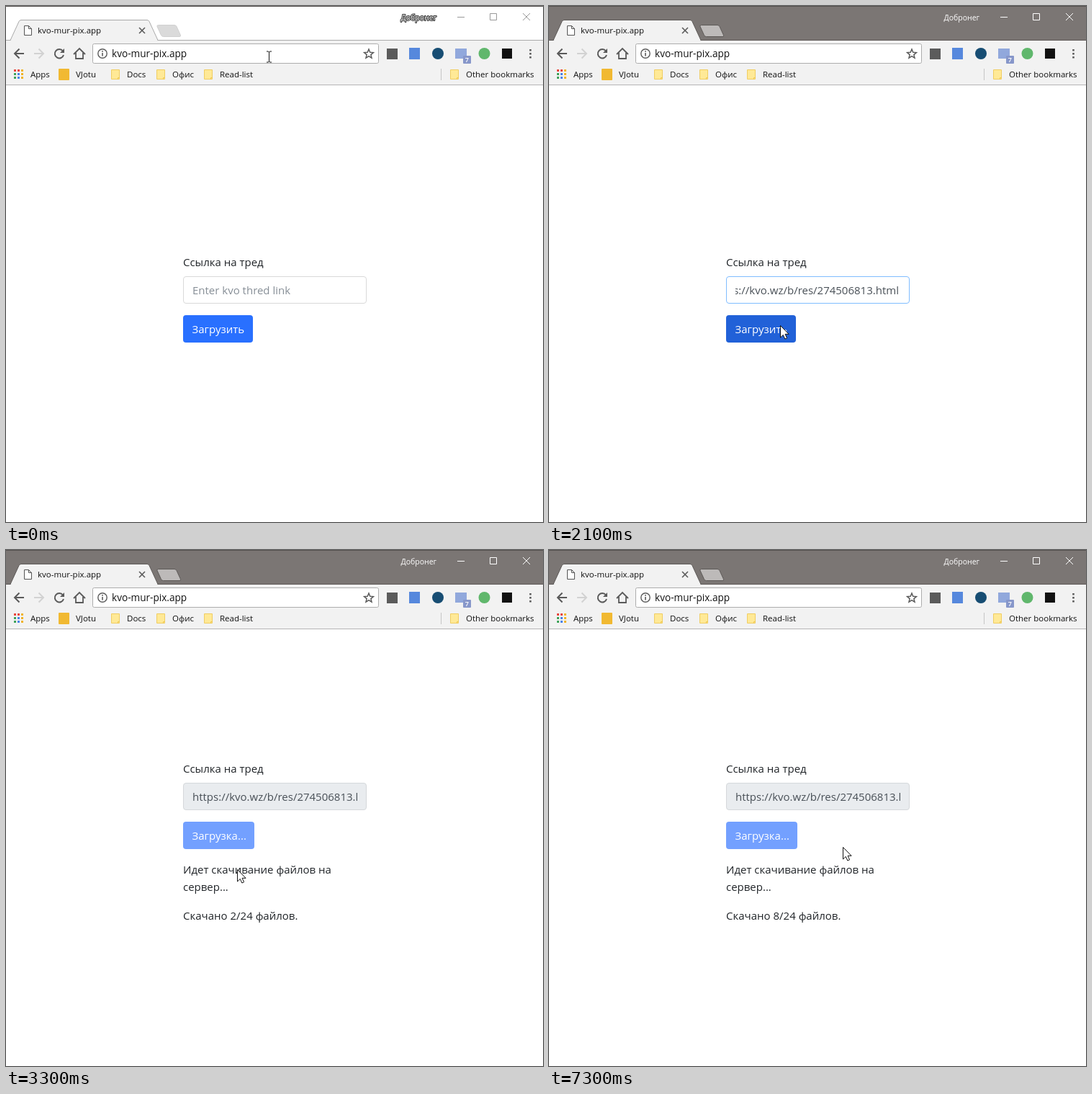
Recreate the animation shown at these times as an HTML page. Size 746 by 716 pixels, loop 8 s.

```html
<!DOCTYPE html>
<html lang="ru">
<head>
<meta charset="utf-8">
<title>Thread loader</title>
<style>
  html, body { margin: 0; width: 100%; height: 100%; overflow: hidden; background: #fff; }
  svg { display: block; }
  text { font-family: "Open Sans", "Noto Sans", sans-serif; white-space: pre; }
  .small { font-size: 11.5px; fill: #111; }
  .page { font-size: 15px; fill: #212529; }
  .icon { fill: none; stroke: #5a5a5a; stroke-width: 2; }
  #caption { fill: none; stroke: #999; }
  .active #caption { stroke: #fff; }
  #user { font-size: 10.5px; fill: #fff; stroke: #333; stroke-width: 2; paint-order: stroke; stroke-linejoin: round; }
  .active #user { stroke: none; }
  #titlebar { fill: #fff; }
  .active #titlebar { fill: #7b7674; }
  #tabs { stroke: #a9a9a9; }
  .active #tabs { stroke: #5d5957; }
  #newTab { fill: #dadada; stroke: #d0d0d0; }
  .active #newTab { fill: #bdbab9; stroke: #5d5957; }
</style>
</head>
<body>
<svg id="stage" width="746" height="716" viewBox="0 0 746 716">
  <defs>
    <clipPath id="inputClip"><rect x="259" y="376" width="229" height="36"/></clipPath>
    <g id="folder">
      <path d="M.5 1.5h11v13H.5z" fill="#ffe996" stroke="#f0cd62"/>
      <path d="M9.5 14.5v-2h2" fill="none" stroke="#efc64f"/>
    </g>
  </defs>

  <rect id="titlebar" width="746" height="48"/>
  <path d="M0 .5H746" stroke="#55514f"/>
  <text id="user" x="548.5" y="20">Добронег</text>
  <path id="caption" d="M627 15.5h10M672.5 10.5h9v9h-9zM718 10l10 10m0-10l-10 10"/>

  <rect y="48" width="746" height="61" fill="#f2f2f2"/>
  <path d="M0 109.5H746" stroke="#b6b4b6"/>
  <g id="tabs">
    <path d="M0 47.5H746"/>
    <path d="M6 47.5L18 21.5Q19 19.5 21 19.5H196Q198 19.5 199 21.5L211 47.5" fill="#f2f2f2"/>
    <path d="M7 48H210" stroke="#f2f2f2" stroke-width="2"/>
    <path id="newTab" d="M211.5 26.5H234Q236 26.5 237 28.5L242.5 40.5Q243 42.5 241 42.5H218.5Q216.5 42.5 215.5 40.5L210 28.5Q209.5 26.5 211.5 26.5z"/>
  </g>
  <path d="M25.500 27.500h6l4 4v9h-10zM31.500 27.500v4h4" fill="#fff" stroke="#555"/>
  <text class="small" x="44" y="38">kvo-mur-pix.app</text>
  <path class="icon" style="stroke-width:1.6" d="M185 30l8 8m0-8l-8 8"/>

  <path class="icon" d="M25 66H12.5M18.5 59.5L12 66l6.500 6.500"/>
  <path class="icon" style="stroke:#d2d2d2" d="M39 66h12.5M45.5 59.5L52 66l-6.500 6.500"/>
  <path class="icon" d="M79 62.5A6.200 6.200 0 1 0 80 68"/>
  <path d="M81 59v6h-6z" fill="#5a5a5a"/>
  <path class="icon" style="stroke-width:1.8" d="M94 67l8-8 8 8M97 65v8h10v-8"/>
  <rect x="120.5" y="52.5" width="397" height="27" rx="2" fill="#fff" stroke="#adadad"/>
  <circle class="icon" style="stroke-width:1.4" cx="134" cy="66" r="6.2"/>
  <path class="icon" style="stroke-width:1.6" d="M134 62v1.8M134 65v4.5"/>
  <text x="147" y="71" font-size="13.6" fill="#111">kvo-mur-pix.app</text>
  <path class="icon" style="stroke-width:1.5" d="M504 60l1.8 4.2 4.6.4-3.5 3 1.1 4.500-4-2.400-4 2.400 1.100-4.500-3.500-3 4.600-.4z"/>

  <rect x="529" y="59" width="15" height="15" fill="#5b5b5b"/>
  <rect x="560" y="58" width="15" height="16" fill="#5688dd"/>
  <circle cx="600" cy="66" r="8" fill="#174d73"/>
  <rect x="624" y="59" width="16" height="14" fill="#91a8dc"/>
  <rect x="635" y="69" width="11" height="11" rx="1" fill="#8797ca"/>
  <text x="637.7" y="78" font-size="9" font-weight="600" fill="#fff">7</text>
  <circle cx="664.5" cy="66" r="8" fill="#60b76c"/>
  <rect x="689" y="59" width="14" height="14" fill="#111"/>
  <path d="M728.5 60v2.6M728.5 65v2.6M728.5 70v2.6" stroke="#5a5a5a" stroke-width="2.6"/>

  <g id="apps"></g>
  <rect x="73" y="87" width="15" height="16" rx="1" fill="#f1b932"/>
  <g id="bookmarks"></g>
  <path d="M604.5 87v16" stroke="#c5c5c5"/>

  <g id="form">
    <text class="page" x="246" y="361">Ссылка на тред</text>
    <rect id="field" x="246.5" y="375.5" width="254" height="37" rx="3.5"/>
    <g clip-path="url(#inputClip)"><text id="value" class="page" y="400"></text></g>
    <path id="caret" stroke="#222"/>
    <rect id="ring" x="245" y="428" height="40" rx="5" fill="none" stroke="#2970ff" stroke-width="2"/>
    <rect id="button" x="246" y="429" height="38" rx="4"/>
    <text id="action" class="page" x="258.5" y="454" style="fill:#fff"></text>
    <text id="line1" class="page" x="246" y="501"></text>
    <text id="line2" class="page" x="246" y="525"></text>
    <text id="status" class="page" x="246" y="565"></text>
  </g>

  <g id="pointer">
    <path id="arrow" d="M-.5 .5v16.5l3.800-3.600 2.500 5.600 2.800-1.200-2.500-5.500h5z" fill="#fff" stroke="#111"/>
    <path id="beam" d="M-3.500-7.500h2.500l1 1 1-1h2.500M0-6.500V6.500M-3.500 7.500h2.500l1-1 1 1h2.500" transform="translate(.5 .5)" fill="none" stroke="#111"/>
  </g>
</svg>
<script>
const LOOP = 8000, STEP = 100;
const LINK = "https://kvo.wz/b/res/274506813.html";
const $ = id => document.getElementById(id);
const set = (id, attrs) => {
  for (const name in attrs) $(id).setAttribute(name, attrs[name]);
};
const show = (id, visible) => set(id, { visibility: visible ? "visible" : "hidden" });

// Value of the last [time, value] pair that has been reached.
const at = (t, pairs) => pairs.filter(([start]) => t >= start).pop()[1];

const POINTER = [
  [0, 365, 70], [600, 343, 384], [1600, 343, 384],
  [2000, 322, 443], [3600, 322, 443], [4200, 409, 412], [LOOP, 409, 412]
];
const FIELD_STROKE = [[0, "#d9d9d9"], [700, "#b2cbe3"], [800, "#80bdff"], [2500, "#d5d8db"]];
const BUTTON_FILL = [[0, "#2970ff"], [2500, "#3872e8"], [2600, "#73a0ff"]];
const RING_OPACITY = [[0, 0], [2400, .4], [2500, .12], [2600, 0]];
const SHIFT = [[0, 0], [2600, -20], [2900, -32], [3000, -52]];
const MESSAGE = [[0, ""], [2600, "Идет обработка треда..."], [2900, "Идет скачивание файлов на"]];
const COUNT = [[0, 0], [3000, 1], [3300, 2], [3500, 3], [3700, 4], [3900, 5], [4200, 6], [6100, 7], [7300, 8]];

function pointerAt(t) {
  const i = POINTER.findIndex(([time]) => time > t);
  const [t0, x0, y0] = POINTER[i - 1], [t1, x1, y1] = POINTER[i];
  const p = (t - t0) / (t1 - t0), k = p * p * (3 - 2 * p);
  return [Math.round(x0 + (x1 - x0) * k), Math.round(y0 + (y1 - y0) * k)];
}

function drawBookmarks() {
  const colors = ["#e8453c", "#e8453c", "#f0b429", "#3fa35a", "#4a84e8", "#f0b429", "#3fa35a", "#4a84e8", "#f0b429"];
  $("apps").innerHTML = colors.map((color, i) =>
    `<rect x="${11 + i % 3 * 5}" y="${88 + Math.floor(i / 3) * 5}" width="3" height="3" fill="${color}"/>`).join("");
  const items = [["Apps", 34], ["VJotu", 97], ["Docs", 168, 146], ["Офис", 231, 209], ["Read-list", 297, 275], ["Other bookmarks", 639, 617]];
  $("bookmarks").innerHTML = items.map(([label, x, folderX]) =>
    (folderX ? `<use href="#folder" x="${folderX}" y="87"/>` : "") +
    `<text class="small" x="${x}" y="99">${label}</text>`).join("");
}

function render(time) {
  const t = Math.floor(time / STEP) * STEP;
  const [x, y] = pointerAt(t);
  const pasted = t >= 1200, loading = t >= 2500;
  const editing = pasted && !loading;
  const hover = !loading && y >= 429 && y < 467;
  const beam = y < 80 || (!loading && y >= 375 && y < 413);
  const width = loading ? 99 : 97;

  $("stage").classList.toggle("active", t >= 700);
  set("form", { transform: `translate(0 ${at(t, SHIFT)})` });

  set("field", { fill: loading ? "#e9ecef" : "#fff", stroke: at(t, FIELD_STROKE) });
  $("value").textContent = pasted ? LINK : "Enter kvo thred link";
  $("value").style.fill = pasted ? "#495057" : "#868e96";
  set("value", { x: editing ? 486 : 259, "text-anchor": editing ? "end" : "start" });
  set("caret", { d: `M${pasted ? 486.5 : 259.5} 384v20` });
  show("caret", (t >= 700 && t < 1700) || (t >= 2200 && t < 2400));

  set("button", { width, fill: hover ? "#2161d8" : at(t, BUTTON_FILL) });
  set("ring", { width: width + 2, opacity: at(t, RING_OPACITY) });
  $("action").textContent = loading ? "Загрузка..." : "Загрузить";

  $("line1").textContent = at(t, MESSAGE);
  $("line2").textContent = t >= 2900 ? "сервер..." : "";
  $("status").textContent = t >= 3000 ? `Скачано ${at(t, COUNT)}/24 файлов.` : "";

  set("pointer", { transform: `translate(${x} ${y})` });
  show("beam", beam);
  show("arrow", !beam);
}

drawBookmarks();
const start = performance.now();
function tick() {
  render((performance.now() - start) % LOOP);
  requestAnimationFrame(tick);
}
tick();
</script>
</body>
</html>
```
